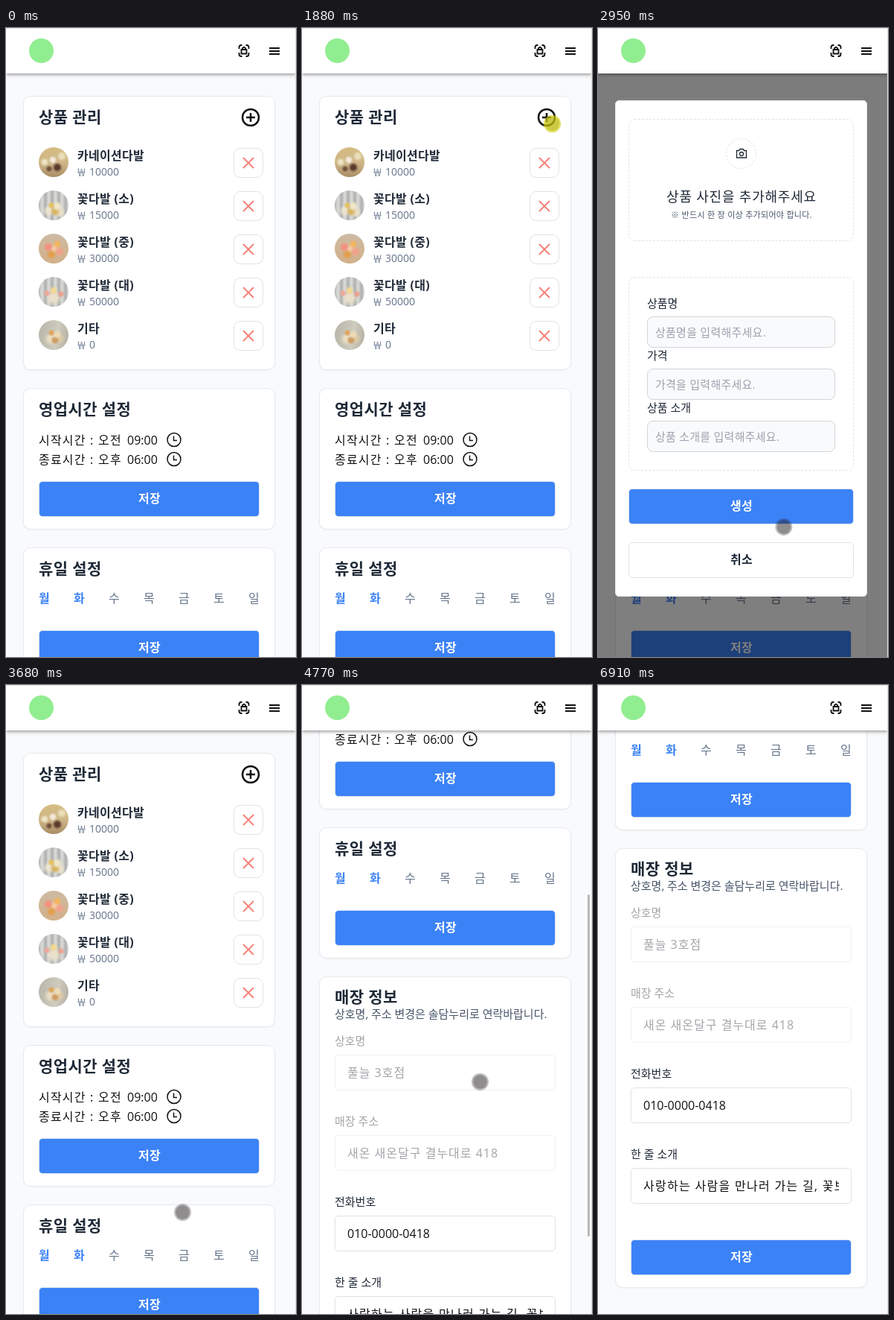
Animation of 390x844 px, one loop 7500 ms. Source, as an HTML page:

```html
<!DOCTYPE html>
<html lang="ko">
<head>
<meta charset="utf-8">
<title>상품 관리</title>
<style>
html, body { margin: 0; width: 100%; height: 100%; overflow: hidden; }
body { font-family: "Open Sans", "Noto Sans CJK KR", sans-serif; }
#stage { position: relative; width: 390px; height: 844px; overflow: hidden; background: #f9fafc; }
#stage div, #stage span, #stage svg { position: absolute; box-sizing: border-box; }
#page, #modal { left: 0; top: 0; width: 390px; }
#stage span { white-space: pre; line-height: 24px; margin-top: -12px; color: #1f2937; }
#stage .mid { transform: translateX(-50%); }
#stage .bold { font-weight: 700; }
#stage .black { color: #111; }
#stage .slate { color: #64748b; }
#stage .ink { color: #475569; }
#stage .faint { color: #a3a5a9; }
#stage .hint { color: #9ca3af; }
#stage .white { color: #fff; }
#stage .blue { color: #3b82f6; font-weight: 700; }
.card { background: #fff; border: 1px solid #e5e9ee; border-radius: 10px; box-shadow: 0 1px 2px #0000000a; }
.button { background: #3b82f6; border: 1px solid #dbe3ee; border-radius: 5px; }
.plain { background: #fff; border: 1px solid #dfe2e7; border-radius: 5px; }
.off { background: #fff; border: 1px solid #f0f1f3; border-radius: 5px; }
.field { background: #f9fafb; border: 1px solid #d1d5db; border-radius: 8px; }
.dash { border: 1px dashed #dfe2e6; border-radius: 8px; }
.remove { background: #fff; border: 1px solid #dfe3e9; border-radius: 9px; }
.photo { border-radius: 50%; }
.clip { overflow: hidden; }
#stage svg { left: 0; top: 0; overflow: visible; fill: none; stroke: #111; }
#shade { left: 0; top: 61px; width: 390px; height: 783px; background: #00000080; }
#dialog { left: 23px; top: 97px; width: 339px; height: 666px; background: #fff; border: 1px solid #e5e7eb; border-radius: 5px; }
#header { left: 0; top: 0; width: 390px; height: 61px; background: #fff; box-shadow: 0 1px 5px #00000080; }
#mark { left: 31px; top: 14px; width: 33px; height: 33px; border-radius: 50%; background: #90ee90; }
#edge { inset: 0; border: solid #e2e2e2; border-width: 1px 1px 0 0; }
#bar { left: 384px; width: 3px; height: 459px; border-radius: 2px; background: #b8b8b8; }
#cursor { left: -11.5px; top: -11.5px; width: 23px; height: 23px; border-radius: 50%; border: 2px solid #221c1e48; background: #221c1e80 padding-box; }
#cursor.press::after { content: ""; position: absolute; inset: -2px; border-radius: 50%; background: #ffff0088; }
</style>
</head>
<body>
<div id="stage">
  <div id="page"></div>
  <div id="modal"><div id="shade"></div><div id="dialog"></div></div>
  <div id="header">
    <div id="mark"></div>
    <svg width="390" height="61" stroke-width="1.8">
      <path d="M313.5 28v-2q0-3 3-3h1M322.500 23h1q3 0 3 3v2M313.500 33v2q0 3 3 3h1M322.500 38h1q3 0 3-3v-2" />
      <path d="M316.500 29h7v5.500h-7zM318 29v-2l2-1.500 2 1.500v2" />
      <path d="M354 27h14M354 31h14M354 35h14" stroke-width="2" />
    </svg>
  </div>
  <div id="edge"></div>
  <div id="bar"></div>
  <div id="cursor"></div>
</div>
<script>
const $ = id => document.getElementById(id);
const text = (x, y, size, str, cls = "", gap = 0) =>
  `<span class="${cls}" style="left:${x}px;top:${y}px;font-size:${size}px;letter-spacing:${gap}px">${str}</span>`;
const box = (cls, x, y, w, h, inner = "", style = "") =>
  `<div class="${cls}" style="left:${x}px;top:${y}px;width:${w}px;height:${h}px;${style}">${inner}</div>`;
const icon = (x, y, width, shapes, color = "#111") =>
  `<svg width="1" height="1" style="stroke:${color};stroke-width:${width};transform:translate(${x}px,${y}px)">${shapes}</svg>`;
const title = (y, str) => text(44, y, 21, str, "bold", 0.4);
const save = y => box("button", 44, y, 297, 48) + text(193, y + 23, 16, "저장", "mid bold white", 0.3);

// Soft colour spots over a base tone, standing for the product photos
const spots = (base, ...list) => "background:" + list.map(([color, x, y, r]) =>
  `radial-gradient(circle at ${x}px ${y}px, ${color} ${r * 0.4}px, transparent ${r}px)`).join() + "," + base;
const curtain = "repeating-linear-gradient(90deg, #a9adab, #dcdcd9 4px, #c6c8c5 7px, #a9adab 9px)";

const products = [
  ["카네이션다발", 10000, spots("linear-gradient(#d6bd83, #cdb587 55%, #a98d66)",
    ["#f3e9dc", 19, 17, 6], ["#5a3a2a", 25, 27, 7], ["#75543d", 14, 29, 5], ["#eadfb9", 31, 12, 7], ["#efe3c6", 8, 20, 6])],
  ["꽃다발 (소)", 15000, spots(curtain,
    ["#e5c25e", 17, 20, 5], ["#f1e7c8", 25, 21, 7], ["#d8b565", 22, 28, 7], ["#ece4cf", 14, 27, 8], ["#e9dfc6", 28, 29, 8])],
  ["꽃다발 (중)", 30000, spots("linear-gradient(#cdbba3, #d3b08a)",
    ["#f2917f", 13, 18, 7], ["#f4b45d", 25, 14, 6], ["#f0a28c", 28, 24, 7], ["#e2a04c", 17, 28, 7], ["#f3cda4", 21, 20, 7])],
  ["꽃다발 (대)", 50000, spots(curtain,
    ["#f0a59b", 11, 22, 5], ["#f3d992", 20, 18, 6], ["#eba08f", 30, 23, 5], ["#eadfca", 20, 28, 11])],
  ["기타", 0, spots("linear-gradient(100deg, #b7b5a8, #cfccbf 60%, #b1ac9e)",
    ["#e0a55f", 17, 17, 5], ["#f0dcb4", 25, 19, 6], ["#cf9c63", 22, 27, 6], ["#e9dcc0", 16, 25, 9], ["#dfcba6", 28, 25, 7])]
];

const productRow = ([name, price, photo], i) => {
  const y = 160 + 58 * i;
  return box("photo", 44, y, 40, 40, "", photo) +
    text(96, y + 11, 16, name, "bold", 0.3) +
    text(95, y + 33, 13, "￦", "slate") + text(112, y + 33, 14, price, "slate") +
    box("remove", 306, y + 1, 40, 40) +
    icon(326, y + 21, 2, '<path d="M-7-7 7 7M7-7-7 7"/>', "#f5837b");
};

const hoursRow = (y, label, half, time) =>
  text(44, y, 16, label + " :", "black", 1.2) + text(124, y, 16, half, "black", 1.2) +
  text(163, y, 16, time, "black") +
  icon(226, y - 0.5, 1.5, '<circle r="9"/><path d="M-.5-5V1H4"/>');

const day = (name, i) => text(44 + 47 * i, 765, 16, name, i < 2 ? "blue" : "slate");

const infoField = (y, label, value, off, gap) =>
  text(44, y, 15, label, off ? "faint" : "") +
  box(off ? "off" : "plain", 44, y + 19, 297, 48) +
  box("clip", 61, y + 25, 263, 36, text(0, 18, 16, value, off ? "faint" : "black", gap));

$("page").innerHTML =
  box("card", 23, 91, 339, 368) + title(119, "상품 관리") +
  icon(329, 120, 2.5, '<circle r="11"/><path d="M-6 0H6M0-6V6"/>') +
  products.map(productRow).join("") +
  box("card", 23, 483, 339, 190) + title(511, "영업시간 설정") +
  hoursRow(553, "시작시간", "오전", "09:00") + hoursRow(579, "종료시간", "오후", "06:00") + save(608) +
  box("card", 23, 697, 339, 176) + title(725, "휴일 설정") +
  [..."월화수목금토일"].map(day).join("") + save(808) +
  box("card", 23, 897, 339, 590) + title(924, "매장 정보") +
  text(44, 947, 15, "상호명, 주소 변경은 솔담누리로 연락바랍니다.", "ink") +
  infoField(983, "상호명", "풀늘 3호점", true, 1) +
  infoField(1091, "매장 주소", "새온 새온달구 결누대로 418", true, 1) +
  infoField(1199, "전화번호", "010-0000-0418", false, 0) +
  infoField(1307, "한 줄 소개", "사랑하는 사람을 만나러 가는 길, 꽃보다", false, 1.3) +
  save(1422);

const formField = (y, label, hint) =>
  text(66, y, 15, label) + box("field", 66, y + 18, 253, 42) + text(77, y + 39, 15, hint, "hint", 0.25);

$("modal").innerHTML +=
  box("dash", 41, 122, 303, 164) + box("dash", 172, 148, 41, 41, "", "border-radius:50%") +
  icon(193, 168.5, 1.3, '<path d="M-6.500-4h3l1.500-2h4l1.500 2h3v9.500h-13z"/><circle r="2.500" cy=".5"/>', "#1f2937") +
  text(193, 226, 18, "상품 사진을 추가해주세요", "mid", 0.8) +
  text(193, 251, 11, "※ 반드시 한 장 이상 추가되어야 합니다.", "mid ink", 0.3) +
  box("dash", 41, 334, 303, 260) +
  formField(369, "상품명", "상품명을 입력해주세요.") +
  formField(439, "가격", "가격을 입력해주세요.") +
  formField(509, "상품 소개", "상품 소개를 입력해주세요.") +
  box("button", 41, 618, 303, 48) + text(193, 641, 16, "생성", "mid bold white", 0.3) +
  box("plain", 41, 690, 303, 48) + text(193, 713, 16, "취소", "mid bold", 0.3);

const LOOP = 7500;
// start, end, steps, then the points of a quadratic curve
const moves = [
  [200, 720, 9, [398, 848], [215, 613], [284, 378]],
  [1120, 1610, 7, [284, 378], [310, 253], [336, 128]],
  [2140, 2880, 12, [336, 128], [295, 392], [254, 655]],
  [2950, 3280, 6, [254, 655], [239, 700], [237, 707]],
  [3750, 4220, 7, [237, 707], [241, 620], [239, 532]],
  [6430, 6910, 8, [239, 532], [306, 705], [374, 878]]
];

const within = (t, a, b) => t >= a && t < b;
const stepped = (t, start, end, n) => t < start ? 0 :
  Math.min(1, (Math.floor((t - start) * (n - 1) / (end - start) + 1e-6) + 1) / n);
const easeOut = (p, power) => 1 - (1 - p) ** power;

function cursorAt(t) {
  const [start, end, n, a, b, c] = moves.filter(m => t >= m[0]).pop() || moves[0];
  const p = stepped(t, start, end, n), q = 1 - p;
  return [0, 1].map(i => q * q * a[i] + 2 * p * q * b[i] + p * p * c[i]);
}

function draw(t) {
  const first = easeOut(stepped(t, 4420, 4770, 6), 1.17);
  const second = easeOut(stepped(t, 5910, 6040, 3), 2);
  const scroll = Math.floor(506 * first + 172 * second);
  $("page").style.transform = `translateY(${-scroll}px)`;
  $("bar").style.top = 4 + 0.5465 * scroll + "px";
  $("bar").style.opacity = within(t, 4420, 5180) || within(t, 5910, 6170) ? 1 : within(t, 5180, 5310) ? 0.5 : 0;
  $("modal").style.display = within(t, 1940, 3610) ? "block" : "none";
  const [x, y] = cursorAt(t), cursor = $("cursor");
  cursor.style.display = within(t, 200, 6910) ? "block" : "none";
  cursor.style.transform = `translate(${x}px,${y}px)`;
  cursor.className = within(t, 1880, 1940) || within(t, 3480, 3610) ? "press" : "";
}

const began = performance.now();
function tick() {
  draw((performance.now() - began) % LOOP);
  requestAnimationFrame(tick);
}
tick();
</script>
</body>
</html>
```
